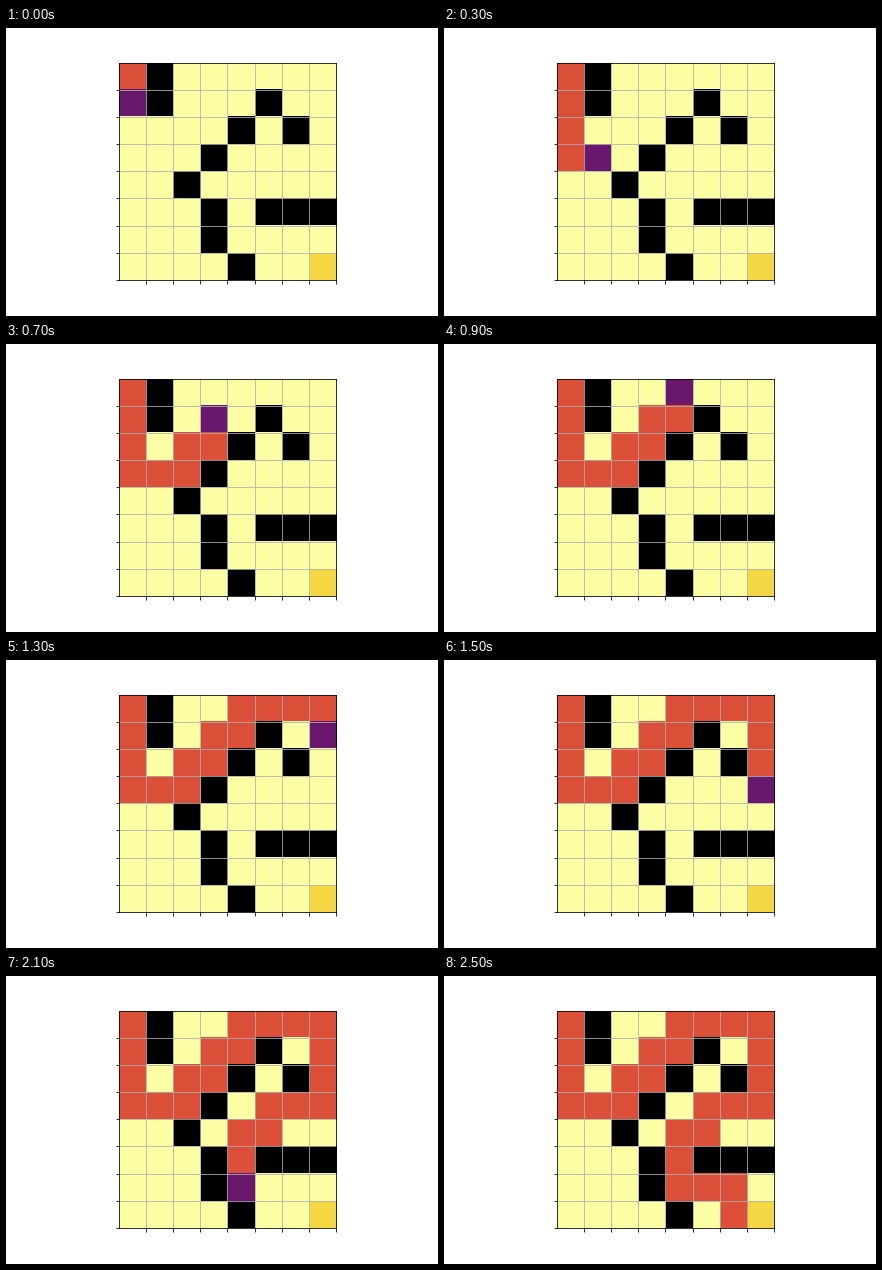
These frames come from a looping animation (432 px wide and 288 px high, 2600 ms). A matplotlib script:

```python
import matplotlib.pyplot as plt
import numpy as np
from matplotlib.animation import FuncAnimation

SIZE = 8
FREE, WALL, VISITED, AGENT, GOAL = 1.0, 0.0, 0.6, 0.3, 0.9
WALLS = [(0, 1), (1, 1), (1, 5), (2, 4), (2, 6), (3, 3), (4, 2),
         (5, 3), (5, 5), (5, 6), (5, 7), (6, 3), (7, 4)]
MOVES = "DDDRRURURURRRDDDLLDLDDRRDR"
STEPS = {"U": (-1, 0), "D": (1, 0), "L": (0, -1), "R": (0, 1)}


def walk(start, moves):
    cells = [start]
    for move in moves:
        row, col = cells[-1]
        d_row, d_col = STEPS[move]
        cells.append((row + d_row, col + d_col))
    return cells


PATH = walk((0, 0), MOVES)


def maze(step):
    grid = np.full((SIZE, SIZE), FREE)
    for cell in WALLS:
        grid[cell] = WALL
    for cell in PATH[:step + 1]:
        grid[cell] = VISITED
    grid[PATH[step + 1]] = AGENT
    grid[SIZE - 1, SIZE - 1] = GOAL
    return grid


fig, ax = plt.subplots(figsize=(6, 4), dpi=72)
fig.subplots_adjust(left=0.125, right=0.9, bottom=0.125, top=0.88)
image = ax.imshow(maze(0), cmap="inferno", vmin=0, vmax=1,
                  interpolation="nearest")
edges = np.arange(0.5, SIZE)
ax.set_xticks(edges, labels=[])
ax.set_yticks(edges, labels=[])
ax.grid(True)


def update(step):
    image.set_data(maze(step))
    return [image]


anim = FuncAnimation(fig, update, frames=len(MOVES), interval=100, repeat=True)
plt.show()
```
